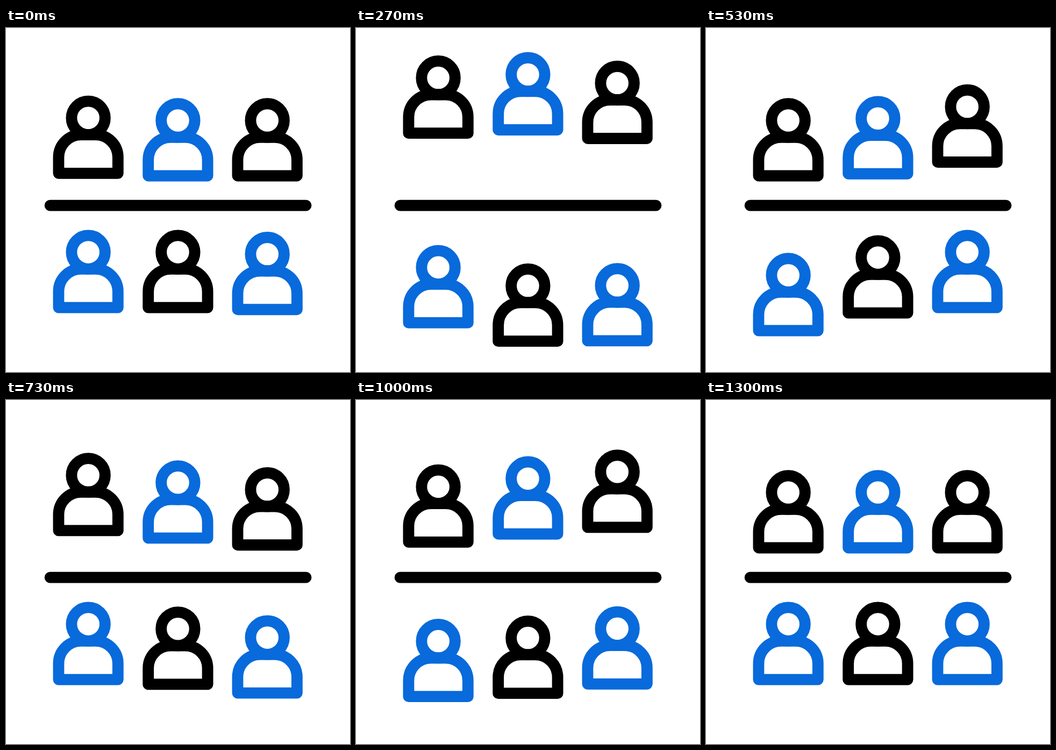
Write an HTML page without scripts that moves like this. It is 640x640 px and loops after 1670 ms.

```html
<!DOCTYPE html>
<html lang="en">
<head>
<meta charset="utf-8">
<title>Hopping people</title>
<style>
  @property --clock { syntax: "<number>"; inherits: true; initial-value: 0; }

  html, body { margin: 0; width: 100%; height: 100%; overflow: hidden; background: #fff; }

  svg {
    display: block;
    width: 100%;
    height: 100%;
    fill: none;
    stroke: #000;
    stroke-width: 20.83;
    stroke-linecap: round;
    stroke-linejoin: round;
    animation: tick 1670ms -4ms infinite;
  }

  /* 39 ticks at 30 per second, then a rest */
  @keyframes tick {
    0% { --clock: 0; animation-timing-function: steps(39); }
    77.844%, 100% { --clock: 39; }
  }

  /* Two hops: each is an eased rise times an eased fall */
  .person {
    --t: calc(var(--clock) - var(--delay));
    --u: clamp(0, (var(--t) + .85) / 7.25, 1);
    --rise1: calc(var(--u) + .23 * var(--u) * (1 - var(--u)));
    --fall1: clamp(0, (15.08 - var(--t)) / 8.54, 1);
    --rise2: clamp(0, (var(--t) - 16.1) / 8.45, 1);
    --fall2: clamp(0, (32.63 - var(--t)) / 7.9, 1);
    --hop1: calc(var(--rise1) * var(--rise1) * (3 - 2 * var(--rise1))
               * var(--fall1) * var(--fall1) * (3 - 2 * var(--fall1)));
    --hop2: calc(var(--rise2) * var(--rise2) * (3 - 2 * var(--rise2))
               * var(--fall2) * var(--fall2) * (3 - 2 * var(--fall2)));
    transform: translateY(calc(var(--height) * (var(--hop1) + .477 * var(--hop2))));
  }

  .up { --height: -86px; }
  .down { --height: 67px; }
  .blue { stroke: #086adb; }
</style>
</head>
<body>
<svg viewBox="0 0 640 640">
  <defs>
    <g id="person">
      <circle r="31.25"/>
      <path d="M-55.2 103V73a41.7 41.7 0 0 1 41.7-41.7h27a41.7 41.7 0 0 1 41.7 41.7v30z"/>
    </g>
  </defs>

  <path d="M82.1 330.2H558"/>

  <g class="up">
    <use class="person" href="#person" x="153.1" y="172" style="--delay: 0"/>
    <use class="person blue" href="#person" x="319.9" y="172" style="--delay: 2"/>
    <use class="person" href="#person" x="486.2" y="172" style="--delay: 4"/>
  </g>

  <g class="down">
    <use class="person blue" href="#person" x="153.1" y="417.1" style="--delay: 6"/>
    <use class="person" href="#person" x="319.9" y="417.1" style="--delay: 3"/>
    <use class="person blue" href="#person" x="486.2" y="417.1" style="--delay: 0"/>
  </g>
</svg>
</body>
</html>
```
